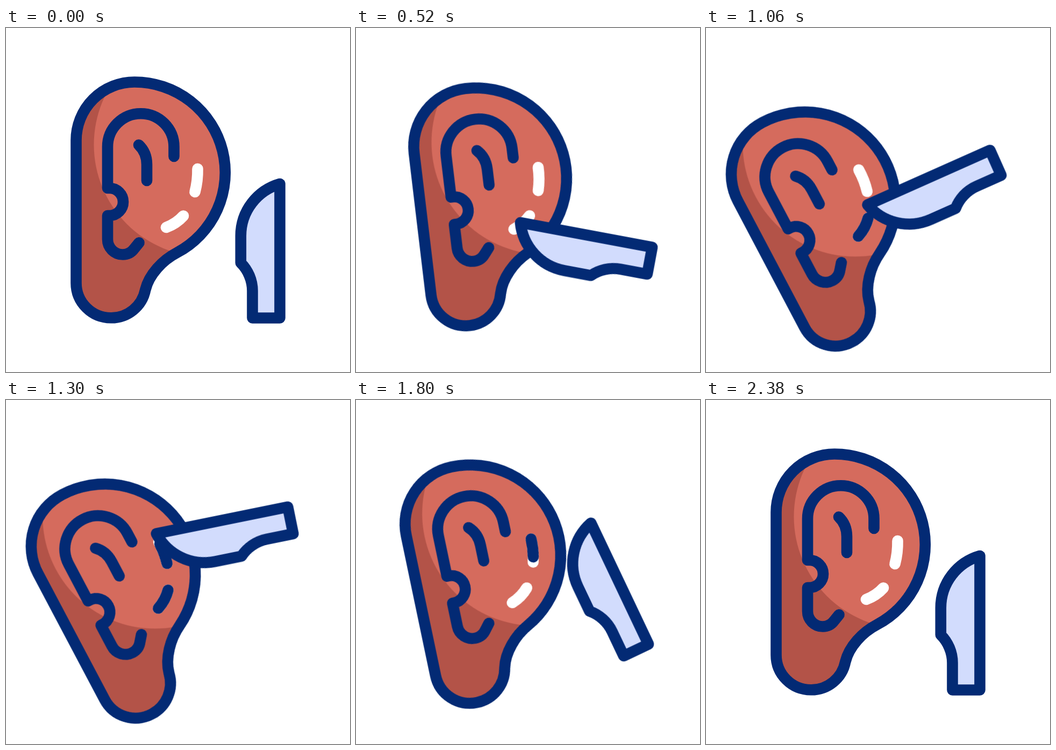
Animation of 640x640 px, one loop 2.4 s. Source, as an HTML page:

```html
<!DOCTYPE html>
<html lang="en">
<head>
<meta charset="utf-8">
<title>Ear surgery</title>
<style>
  :root {
    --navy: #032a74;
    --skin: #d56b5d;
    --shade: #b35348;
    --blade: #d2dcfd;
    --ease: cubic-bezier(.833, 0, .167, 1);
  }
  html, body { margin: 0; width: 100%; height: 100%; overflow: hidden; background: #fff; }
  svg { display: block; width: 100%; height: 100%; }

  path { stroke-width: 20.6; stroke-linecap: round; stroke-linejoin: round; }
  .line { fill: none; stroke: var(--navy); }
  .shine { fill: none; stroke: #fff; }
  .knife { fill: var(--blade); stroke: var(--navy); }

  .scene, .knife, .cut { animation: 2400ms var(--ease) infinite; }
  .scene { transform-origin: 324px 409px; animation-name: tilt; }
  .knife { transform-origin: 488px 514px; animation-name: carve; }
  .cut { stroke-dasharray: 1 3; stroke-dashoffset: 1.01; }
  .low { animation-name: cut-low; }
  .high { animation-name: cut-high; }

  @keyframes tilt {
    0%, 99.167%, 100% { transform: rotate(0deg); }
    49.583% { transform: rotate(-28deg); }
  }
  @keyframes carve {
    0%, 85.833%, 100% { transform: translate(0px, 0px) rotate(0deg); }
    27.917% { transform: translate(32px, -68.6px) rotate(-75.1deg); }
    43.75% { transform: translate(74.7px, -150.4px) rotate(-86.2deg); }
    59.583% { transform: translate(81.4px, -187.4px) rotate(-72.2deg); }
  }
  @keyframes cut-low {
    0%, 27.917% { stroke-dashoffset: 1.01; }
    43.75%, 59.583% { stroke-dashoffset: 0; }
    70.417%, 100% { stroke-dashoffset: -1.01; }
  }
  @keyframes cut-high {
    0%, 43.75% { stroke-dashoffset: 1.01; }
    59.583%, 70.417% { stroke-dashoffset: 0; }
    81.25%, 100% { stroke-dashoffset: -1.01; }
  }
</style>
</head>
<body>
<svg viewBox="0 0 640 640">
  <defs>
    <path id="ear" d="M130.5 209A108.5 108.5 0 0 1 239 100.5A168.5 168.5 0 0 1 318 418C291 432 266 459 259.3 487A64.75 64.75 0 0 1 195.25 539.25A64.75 64.75 0 0 1 130.5 474.5Z"/>
    <path id="low" pathLength="1" d="M298 371Q317 364 330 349.5"/>
    <path id="high" pathLength="1" d="M351.5 305Q357 284 356.5 262"/>
    <clipPath id="inside"><use href="#ear"/></clipPath>
  </defs>

  <g class="scene">
    <use href="#ear" fill="var(--shade)"/>
    <circle cx="372" cy="217" r="208.5" fill="var(--skin)" clip-path="url(#inside)"/>
    <use href="#ear" class="line"/>

    <path class="line" d="M312.5 239V221A61.75 61.75 0 0 0 189 221V298H192.5A25.5 25.5 0 0 1 192.5 349H189V393A28.3 28.3 0 0 0 217.3 421.5C227 421.5 234 417 239 410L247.5 399.5"/>
    <path class="line" d="M247 217.5C257 227 262 240 262 254V284"/>

    <use href="#low" class="shine"/>
    <use href="#high" class="shine"/>
    <use href="#low" class="line cut low"/>
    <use href="#high" class="line cut high"/>

    <path class="knife" d="M509.5 290V539.5H458.5V489C458.5 469 450 450 436.8 437V387C436.8 340 468 302 509.5 290Z"/>
  </g>
</svg>
</body>
</html>
```
